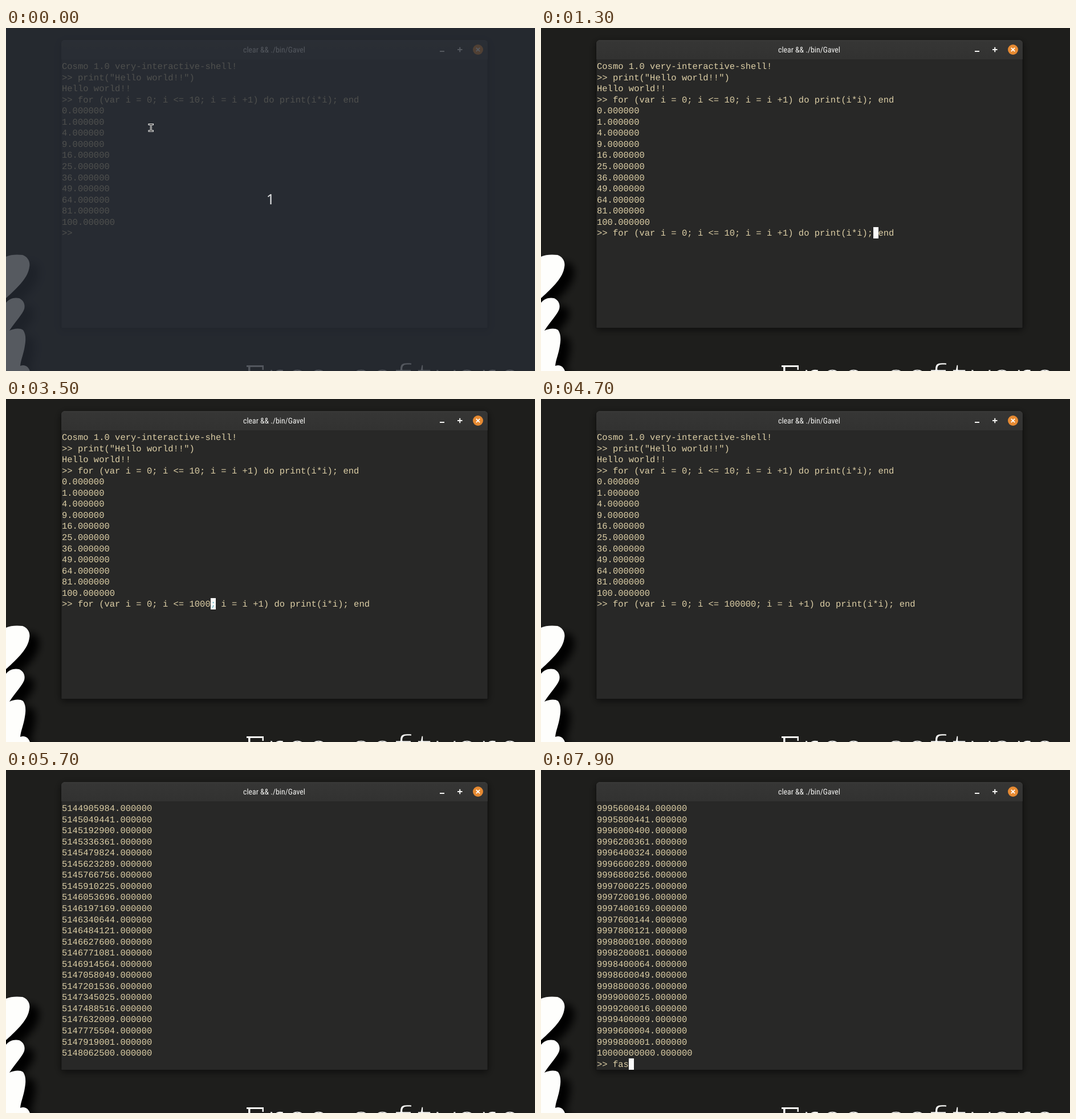
These frames come from a looping animation (928 by 603 pixels, 8000 ms). An HTML page with a canvas:

```html
<!DOCTYPE html>
<html lang="en">
<head>
<meta charset="utf-8">
<title>Interactive shell</title>
<style>
html, body { margin: 0; width: 928px; height: 603px; overflow: hidden; background: #1e1e1c; }
canvas { display: block; }
</style>
</head>
<body>
<canvas id="stage" width="928" height="603"></canvas>
<script>
const ctx = document.getElementById('stage').getContext('2d', { alpha: false });
ctx.textRendering = 'geometricPrecision';

const LOOP = 8000, STEP = 100;
const LEFT = 98, CELL = 9.325, TOP = 57.2, ROW = 19.55, BASE = 14.8;
const BACK = '#1e1e1c', BODY = '#282827', INK = '#ddcfa6';
const TITLE = 'clear && ./bin/Gavel';

// Picks the font size at which a sample has the wanted natural width.
function fitFont(style, family, sample, width) {
  ctx.font = `${style} 100px ${family}`;
  return `${style} ${100 * width / ctx.measureText(sample).width}px ${family}`;
}
const MONO = fitFont('normal', '"Liberation Mono", monospace', '0'.repeat(20), CELL * 20);
const HEAD = fitFont('condensed', '"Roboto Condensed", Roboto, sans-serif', TITLE, 109);

const command = zeros => `>> for (var i = 0; i <= 10${'0'.repeat(zeros)}; i = i +1) do print(i*i); end`;
const squares = (first, count) =>
  Array.from({ length: count }, (_, k) => `${(first + k) ** 2}.000000`);
const HISTORY = [
  'Cosmo 1.0 very-interactive-shell!',
  '>> print("Hello world!!")',
  'Hello world!!',
  command(0),
  ...squares(0, 11)
];

const ZERO_TIMES = [3300, 3500, 4000, 4500];
const CURSOR_OFF = [[0, 300], [2900, 3100], [4100, 4500], [4700, 5100], [5700, 6300], [6900, 7500]];

function editColumn(t) {
  if (t < 1000) return 56;
  if (t < 1300) return 55;
  if (t < 2200) return Math.round(55 - 25 * Math.min(1, (t - 1200) / 800));
  return t < 2300 ? 28 : t < 2500 ? 27 : 26;
}

// Terminal lines and cursor column; the cursor is always on the last line.
function terminal(t) {
  if (t < 400) return { lines: [...HISTORY, '>>'], column: 3 };
  if (t < 5100) {
    const zeros = ZERO_TIMES.filter(at => t >= at).length;
    return { lines: [...HISTORY, command(zeros)], column: editColumn(t) + zeros };
  }
  if (t < 6000) {
    const last = Math.round(32149 + (t - 5300) * 99.0025);
    return { lines: [...squares(last - 22, 23), ''], column: 0 };
  }
  const typed = 'fas'.slice(0, Math.max(0, (t - 7600) / STEP));
  return { lines: [...squares(99978, 23), '>> ' + typed], column: 3 + typed.length };
}

function line(points, color, width) {
  ctx.strokeStyle = color;
  ctx.lineWidth = width;
  ctx.beginPath();
  for (const [x1, y1, x2, y2] of points) {
    ctx.moveTo(x1, y1);
    ctx.lineTo(x2, y2);
  }
  ctx.stroke();
}

function shadow(color, blur, x, y) {
  ctx.shadowColor = color;
  ctx.shadowBlur = blur;
  ctx.shadowOffsetX = x;
  ctx.shadowOffsetY = y;
}

function drawWallpaper() {
  ctx.fillStyle = BACK;
  ctx.fillRect(0, 0, 928, 603);

  ctx.save();
  shadow('#000', 14, 17, 13);
  ctx.fillStyle = '#fefefc';
  ctx.fill(new Path2D(`M-40 415 L0 402 C8 398 20 398 29 399 C38 402 43 411 41 420
    C39 438 22 455 0 475 L0 483 C5 476 14 473 23 475 C31 479 34 486 32 494
    C29 503 18 514 6 532 C14 528 25 527 30 531 C35 538 35 548 33 559
    C31 573 26 583 25 594 C32 591 39 594 42 603 L42 640 L-40 640 Z`));
  ctx.restore();

  // Outlining the letters in the background colour makes them thinner.
  ctx.font = '62.1px "Liberation Mono", monospace';
  ctx.textAlign = 'left';
  ctx.fillStyle = '#f4f4f2';
  ctx.fillText('Free software', 418, 632.5);
  ctx.lineJoin = 'round';
  ctx.strokeStyle = BACK;
  ctx.lineWidth = 2.3;
  ctx.strokeText('Free software', 418, 632.5);
  ctx.fillRect(422, 593, 30, 3);
  ctx.fillRect(449.5, 593, 2.5, 8);
}

function drawWindow() {
  ctx.save();
  shadow('rgba(0,0,0,.6)', 13, 0, 3);
  ctx.fillStyle = BODY;
  ctx.beginPath();
  ctx.roundRect(97, 21.5, 748, 506, [5, 5, 0, 0]);
  ctx.fill();
  ctx.restore();
  ctx.strokeStyle = 'rgba(0,0,0,.35)';
  ctx.lineWidth = 1;
  ctx.stroke();

  const bar = ctx.createLinearGradient(0, 22, 0, 55);
  bar.addColorStop(0, '#363635');
  bar.addColorStop(1, '#323231');
  ctx.fillStyle = bar;
  ctx.beginPath();
  ctx.roundRect(97, 21.5, 748, 33.5, [5, 5, 0, 0]);
  ctx.fill();
  line([[101, 22, 841, 22]], '#424241', 1);

  ctx.font = HEAD;
  ctx.textAlign = 'center';
  ctx.fillStyle = '#f2f2f0';
  ctx.fillText(TITLE, 470.5, 43);

  line([[761, 41, 769, 41], [792, 38, 800.5, 38], [796.25, 33.8, 796.25, 42.2]], '#f6f6f4', 2);
  ctx.fillStyle = '#e68a32';
  ctx.beginPath();
  ctx.arc(828, 38, 9, 0, Math.PI * 2);
  ctx.fill();
  line([[824.8, 34.8, 831.2, 41.2], [831.2, 34.8, 824.8, 41.2]], '#fff', 1.8);
}

function drawTerminal(t) {
  const { lines, column } = terminal(t);
  ctx.font = MONO;
  ctx.textAlign = 'left';
  ctx.fillStyle = INK;
  lines.forEach((text, row) => ctx.fillText(text, LEFT, TOP + row * ROW + BASE));

  if (CURSOR_OFF.some(([from, to]) => t >= from && t < to)) return;
  const row = lines.length - 1;
  const x = LEFT + column * CELL;
  const y = Math.round(TOP + row * ROW);
  ctx.fillStyle = '#fbfbfa';
  ctx.fillRect(Math.round(x), y, 9, 20);
  ctx.fillStyle = '#62b4c4';
  ctx.fillText(lines[row][column] || '', x, TOP + row * ROW + BASE);
}

function drawPointer() {
  const beam = [[251, 169.5, 257.5, 169.5], [254.3, 169.5, 254.3, 181], [251, 181, 257.5, 181]];
  ctx.lineCap = 'square';
  line(beam, '#f4f4f2', 3);
  line(beam, '#181818', 1);
  ctx.lineCap = 'butt';
}

function drawCountdown() {
  ctx.fillStyle = 'rgba(39,44,53,.78)';
  ctx.fillRect(0, 0, 928, 603);
  ctx.font = '25px "Noto Sans", sans-serif';
  ctx.textAlign = 'center';
  ctx.fillStyle = '#e2e3e4';
  ctx.fillText('1', 464, 310);
}

function frame() {
  const t = Math.floor(performance.now() % LOOP / STEP) * STEP;
  drawWallpaper();
  drawWindow();
  drawTerminal(t);
  if (t < 300) drawCountdown();
  if (t < 400) drawPointer();
  requestAnimationFrame(frame);
}
frame();
</script>
</body>
</html>
```
